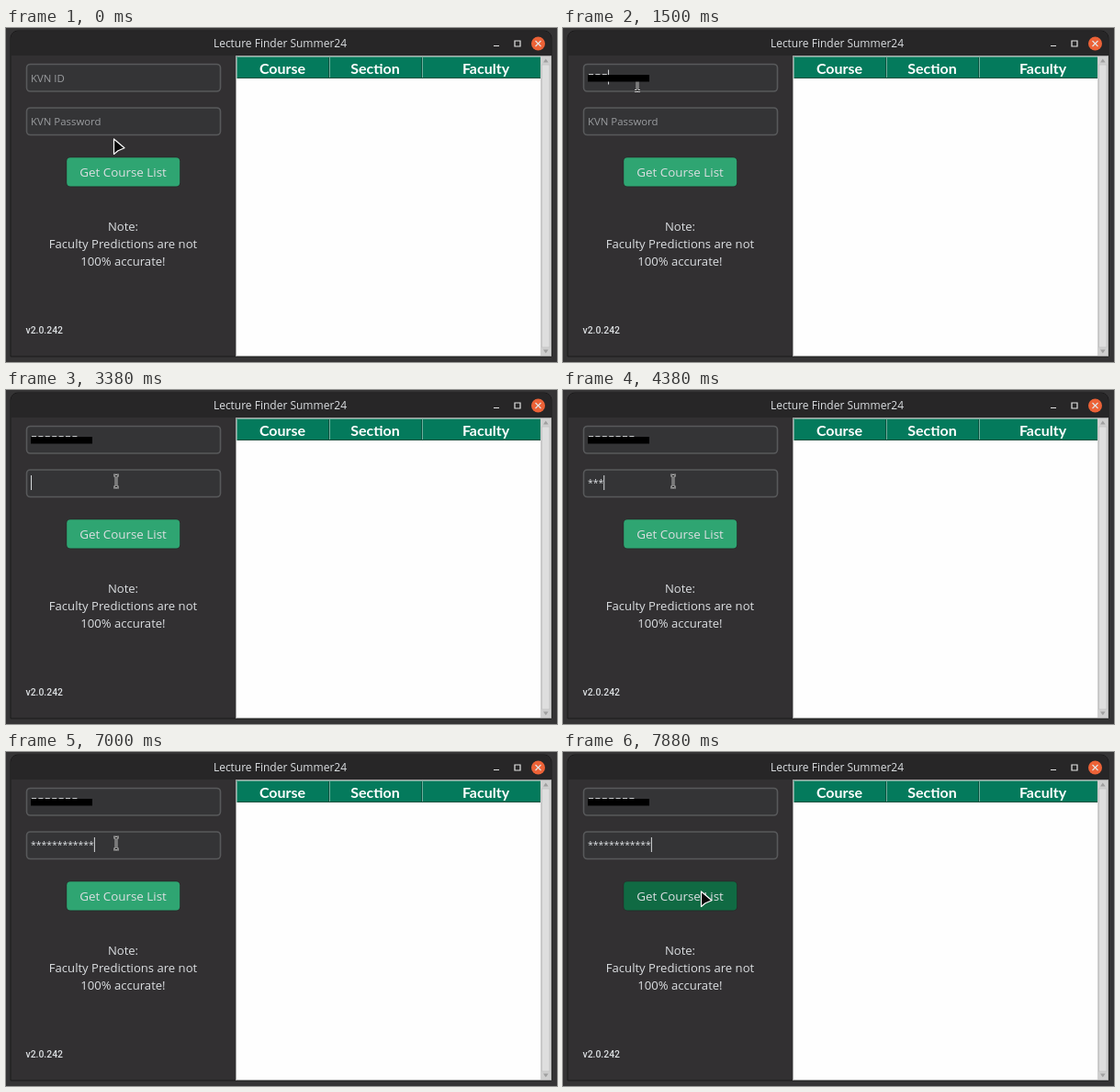
Animation of 600 by 364 pixels, one loop 8 s. Source, as an HTML page:

```html
<!DOCTYPE html>
<html lang="en">
<head>
<meta charset="utf-8">
<title>Lecture Finder</title>
<style>
html, body { margin: 0; width: 100%; height: 100%; overflow: hidden; background: #353435; }
svg { display: block; }
text { font-family: "Open Sans", sans-serif; fill: #dcdfe2; white-space: pre; }
.mid { text-anchor: middle; font-size: 13.1px; font-weight: 500; }
.hint { font-size: 11.4px; fill: #9a9c9f; }
.head { font: bold 16px Lato, sans-serif; fill: #fff; text-anchor: middle; }
.field { fill: #343436; stroke: #58595b; stroke-width: 1.6; }
.caret { stroke: #d5d8da; stroke-width: 1; }
.thin { fill: none; stroke: #e4e4e4; stroke-width: 1.2; }
</style>
</head>
<body>
<svg width="600" height="364" viewBox="0 0 600 364">
  <path d="M5 358V11a8 8 0 0 1 8-8H586a8 8 0 0 1 8 8V358Z" fill="#323032" stroke="#1b1a1b"/>
  <path d="M5.5 30V11a7.5 7.5 0 0 1 7.5-7.5H586a7.5 7.5 0 0 1 7.5 7.5V30Z" fill="#272627"/>
  <text x="298.5" y="21" text-anchor="middle" font-size="12">Lecture Finder Summer24</text>
  <path class="thin" d="M531 19.5h6M554 14h6v6h-6z"/>
  <circle cx="579.5" cy="17" r="7.5" fill="#ec6237"/>
  <path class="thin" d="M576.5 14l6 6m0-6l-6 6"/>

  <rect class="field" x="22.5" y="39.5" width="211" height="29.5" rx="4"/>
  <rect class="field" x="22.5" y="87" width="211" height="29.5" rx="4"/>
  <text class="hint" id="idHint" x="27" y="59">KVN ID</text>
  <text class="hint" id="passHint" x="27" y="106">KVN Password</text>
  <text id="stars" x="27" y="104.8" font-size="10.4" font-weight="500"></text>
  <line class="caret" id="caret" y2="16"/>

  <rect x="65.5" y="140.5" width="124.5" height="33" rx="5" fill="#252b29"/>
  <rect id="button" x="66.2" y="141.2" width="123" height="31.4" rx="4"/>
  <text class="mid" x="127.5" y="162" style="font-size:13.4px">Get Course List</text>
  <text class="mid" x="127.5" y="221">Note:</text>
  <text class="mid" x="127.5" y="240">Faculty Predictions are not</text>
  <text class="mid" x="127.5" y="259">100% accurate!</text>
  <text x="21.5" y="333" style="font:500 10.4px Roboto,sans-serif">v2.0.242</text>

  <rect x="250.5" y="30.5" width="343" height="327" fill="#fefefe" stroke="#a2a2a2"/>
  <rect x="251" y="31" width="331" height="24" fill="#047a5c"/>
  <path d="M251 54.5H582" stroke="#17513f"/>
  <path d="M251.5 55V31.5H582M352.5 31V54M453.5 31V54" fill="none" stroke="#6fae9c"/>
  <path d="M351.5 32V54M452.5 32V54" stroke="#075440"/>
  <text class="head" x="301" y="50">Course</text>
  <text class="head" x="402" y="50">Section</text>
  <text class="head" x="522.5" y="50">Faculty</text>
  <rect x="582" y="31" width="11.5" height="326" fill="#cfcfcf"/>
  <rect x="583.5" y="40" width="8.5" height="308" fill="#dedede" stroke="#c0c0c0" stroke-width=".8"/>
  <path d="M585 37.5l2.8-4 2.8 4zM585 350.5l2.8 4 2.8-4z" fill="#a0a0a0"/>

  <g id="arrow">
    <path d="M0 0V16.5L4.5 12.8L11.5 9.8Z" fill="#080808" stroke="#fff" stroke-width="1.2" stroke-linejoin="round"/>
  </g>
  <g id="beam" fill="none">
    <path d="M-3-6.5h2.2L0-5.5 .8-6.5H3M0-5.5v11M-3 6.5h2.2L0 5.5 .8 6.5H3" stroke="#fff" stroke-width="2.6"/>
    <path d="M-3-6.5h2.2L0-5.5 .8-6.5H3M0-5.5v11M-3 6.5h2.2L0 5.5 .8 6.5H3" stroke="#111" stroke-width="1.1"/>
  </g>
  <g id="mask">
    <rect x="27" y="51" width="67" height="7.5" fill="#000"/>
    <path id="tops" stroke="#c4c6c8" stroke-dasharray="5 2.4"/>
  </g>
</svg>
<script>
const $ = id => document.getElementById(id);
const LOOP = 8000, STEP = 125;
const show = (id, on) => $(id).style.display = on ? "" : "none";
const clamp = (v, lo, hi) => Math.min(hi, Math.max(lo, v));
const ease = (t, a, b) => {
  const p = clamp((t - a) / (b - a), 0, 1);
  return p * p * (3 - 2 * p);
};
// Keys typed so far: first at `start`, then one every `gap` ms.
const typed = (t, start, gap, max) => clamp(Math.floor((t - start) / gap) + 1, 0, max);

// Pointer moves: start, end, target x, target y
const moves = [[100, 580, 81, 62], [2640, 3250, 120, 99.5], [7400, 7850, 150.5, 152]];

function pointer(t) {
  let x = 117.5, y = 121;
  for (const [a, b, tx, ty] of moves) {
    const p = ease(t, a, b);
    x += (tx - x) * p;
    y += (ty - y) * p;
  }
  return [x, y];
}

function draw(t) {
  const [x, y] = pointer(t);
  const onField = y > 39 && y < 70 || y > 86 && y < 118;
  const onButton = y > 141 && y < 173;
  show("beam", onField);
  show("arrow", !onField);
  $(onField ? "beam" : "arrow").setAttribute("transform", `translate(${x} ${y})`);
  $("button").setAttribute("fill", onButton ? "#106a43" : "#2fa572");

  const idFocus = t >= 600, passFocus = t >= 3300;
  const digits = typed(t, 1000, 220, 7);
  const stars = typed(t, 3750, 265, 7) + typed(t, 5490, 150, 5);
  show("idHint", !idFocus);
  show("passHint", !passFocus);
  show("mask", digits);
  $("tops").setAttribute("d", `M28 50.5h${7.3 * digits}`);
  $("stars").textContent = "*".repeat(stars);

  show("caret", idFocus);
  const cx = 27.5 + (passFocus ? 5.74 * stars : 7.35 * digits);
  $("caret").setAttribute("transform", `translate(${cx} ${passFocus ? 93 : 45.5})`);
}

function tick(now) {
  draw(Math.floor(now % LOOP / STEP) * STEP);
  requestAnimationFrame(tick);
}
draw(0);
requestAnimationFrame(tick);
</script>
</body>
</html>
```
